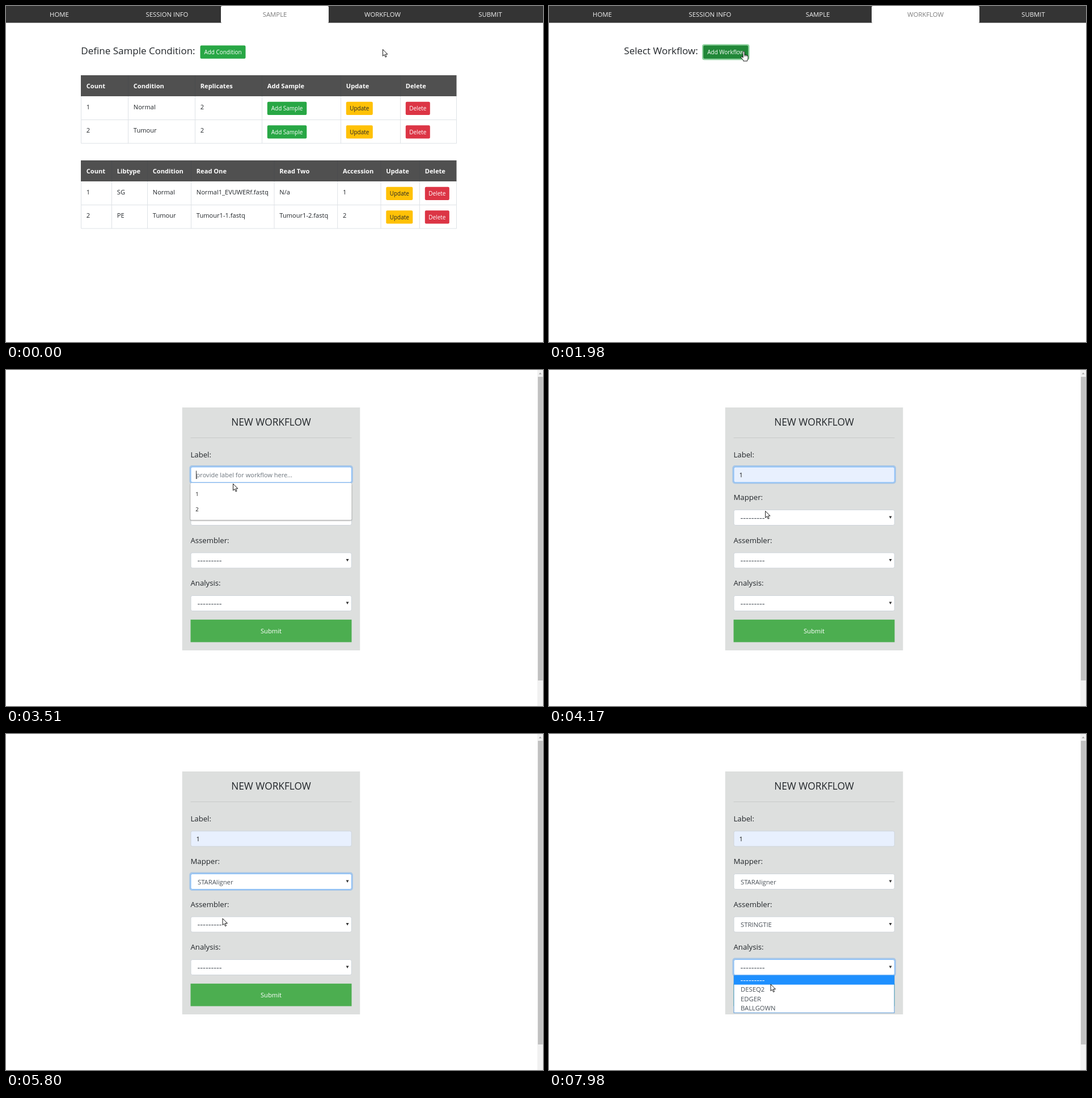
An HTML page that plays this animation: 947 px wide and 592 px high, repeating every 8000 ms.

```html
<!DOCTYPE html>
<html lang="en">
<head>
<meta charset="utf-8">
<title>Workflow form</title>
<style>
html, body { margin: 0; width: 100%; height: 100%; overflow: hidden; background: #fff; }
svg { display: block; font-family: "Open Sans", "Noto Sans", sans-serif; }
</style>
</head>
<body>
<svg id="stage" width="947" height="592" viewBox="0 0 947 592"></svg>
<script>
const LOOP = 8000;
const GREEN = '#28a745', YELLOW = '#ffc107', RED = '#dc3545';
const INK = '#212529', FIELD_INK = '#495057', LINE = '#dee2e6';
const DASHES = '---------';
const ROW = 16.3;

// start, end, number of steps, target x, target y
const moves = [
  [100, 430, 4, 663.5, 24],
  [980, 1200, 3, 550, 53],
  [1520, 1860, 4, 343.5, 80],
  [2630, 2760, 2, 400, 222],
  [3070, 3070, 1, 402, 196],
  [3510, 3510, 1, 400.5, 200.5],
  [3840, 3950, 2, 392, 216],
  [4060, 4270, 3, 378, 260],
  [4950, 5040, 2, 379, 291],
  [5480, 5800, 4, 382, 325],
  [6240, 6560, 4, 386.5, 374],
  [6910, 7210, 4, 389, 413],
  [7880, 7980, 2, 391, 441],
];

const selects = [
  { label: 'Mapper:', y: 246, open: 4600, pick: 5370, blur: 6130,
    options: [DASHES, 'STARAligner', 'HISAT2', 'SALMON'] },
  { label: 'Assembler:', y: 321.5, open: 6130, pick: 6910, blur: 7640,
    options: [DASHES, 'STRINGTIE', 'CUFFLINKS', 'MISO', 'HTSEQ', 'FEATURECOUNTS'] },
  { label: 'Analysis:', y: 397, open: 7640, pick: LOOP, blur: LOOP,
    options: [DASHES, 'DESEQ2', 'EDGER', 'BALLGOWN'] },
];

const pointers = {
  arrow: '<path d="M0 0V11.7L2.7 9.2 4.6 13.6 6.5 12.8 4.6 8.5H8.4Z" fill="#fff" stroke="#000" stroke-width=".9"/>',
  hand: '<path d="M-1.4 11V1.3a1.4 1.4 0 0 1 2.8 0V6.3q1.3-.9 2.3.4 1.3-.7 2.1.5 1.7-.5 1.7 1.3V12q0 2-1.3 3.4V17H-.8V15.6L-4.8 10.8q-.6-1.4.9-1.6 1 .2 2.5 1.8Z" fill="#fff" stroke="#000" stroke-width=".9"/><path d="M1.4 6V9M3.7 6.8V9M5.8 7.4V9" stroke="#000" stroke-width=".7"/>',
  beam: '<path d="M-2.5-6.5H2.5M0-6.5V6.5M-2.5 6.5H2.5" stroke="#000" stroke-width=".9"/>',
};

const between = (t, from, to) => t >= from && t < to;
const rect = (x, y, w, h, fill, more = '') =>
  `<rect x="${x}" y="${y}" width="${w}" height="${h}" fill="${fill}" ${more}/>`;
const text = (x, y, s, size = 11.1, fill = INK, more = '') =>
  `<text x="${x}" y="${y}" font-size="${size}" fill="${fill}" ${more}>${s}</text>`;
const path = (d, color) => `<path d="${d}" fill="none" stroke="${color}"/>`;
const centered = 'text-anchor="middle"';
const heading = s => text(132.3, 85, s, 17, INK, 'font-weight="500"');

function button(x, y, w, label, fill) {
  return rect(x, y, w, 23.3, fill, 'rx="2.2"') +
    text(x + w / 2, y + 15.6, label, 9.95, fill === YELLOW ? INK : '#fff', centered);
}

const buttonKinds = {
  'Add Sample': [69.5, GREEN],
  Update: [47, YELLOW],
  Delete: [43, RED],
};

function table(top, columns, heads, rows) {
  const right = 794.5, edges = [...columns, right];
  let out = rect(132, top, 662.5, 37, '#505050');
  heads.forEach((s, i) => {
    out += text(columns[i] + 9.3, top + 23, s, 11.1, '#fff', 'font-weight="700"');
  });
  out += path(columns.slice(1).map(x => `M${x} ${top}v37`).join(''), '#4a4c4e');
  rows.forEach((cells, r) => {
    const y = top + 37 + r * 41.5;
    out += path(`M132.5 ${y + 41.5}H${right}` + edges.map(x => `M${x} ${y}v41.5`).join(''), LINE);
    cells.forEach((s, i) => {
      const kind = buttonKinds[s], x = columns[i] + 9.3;
      out += kind ? button(x, y + 9.7, kind[0], s, kind[1]) : text(x, y + 22.9, s);
    });
  });
  return out;
}

const samplePage = heading('Define Sample Condition:') +
  button(342.5, 69.5, 80, 'Add Condition', GREEN) +
  table(122, [132.5, 215.5, 333.5, 451.5, 590.5, 695.5],
    ['Count', 'Condition', 'Replicates', 'Add Sample', 'Update', 'Delete'],
    [['1', 'Normal', '2', 'Add Sample', 'Update', 'Delete'],
     ['2', 'Tumour', '2', 'Add Sample', 'Update', 'Delete']]) +
  table(272, [132.5, 186.5, 249.5, 326.5, 473, 584.7, 661, 729.5],
    ['Count', 'Libtype', 'Condition', 'Read One', 'Read Two', 'Accession', 'Update', 'Delete'],
    [['1', 'SG', 'Normal', 'Normal1_EVUWERf.fastq', 'N/a', '1', 'Update', 'Delete'],
     ['2', 'PE', 'Tumour', 'Tumour1-1.fastq', 'Tumour1-2.fastq', '2', 'Update', 'Delete']]);

function cursorAt(t) {
  let x = 664.5, y = 76.5;
  for (const [start, end, steps, tx, ty] of moves) {
    if (t < start) break;
    const done = Math.floor((t - start) / (end - start || 1) * (steps - 1) + 1e-6) + 1;
    const p = Math.min(1, done / steps), e = p * p * (3 - 2 * p);
    x += (tx - x) * e;
    y += (ty - y) * e;
  }
  let shape = 'arrow';
  if (y < 30 || between(t, 1520, 2630) && x < 352) shape = 'hand';
  if (between(t, 3070, 3510)) shape = 'beam';
  return { x, y, shape };
}

function navBar(t, cursor) {
  const active = t < 770 ? 2 : 3;
  let out = rect(0, 0, 947, 29.6, '#343434');
  ['HOME', 'SESSION INFO', 'SAMPLE', 'WORKFLOW', 'SUBMIT'].forEach((s, i) => {
    const lit = i === active || i === 3 && cursor.y < 30;
    if (lit) out += rect(i * 190 - 1, 0, 190, 30, '#fff', 'rx="2"');
    out += text(i * 190 + 94, 19.2, s, 11.35, lit ? '#7b7b7b' : '#f2f2f2', centered);
  });
  return out;
}

function tabPages(t, cursor) {
  const leaving = t < 770 ? 1 : t < 860 ? .8 : t < 980 ? .45 : .13;
  let page = samplePage, opacity = leaving;
  if (t >= 1090) {
    const hover = cursor.shape === 'hand';
    page = heading('Select Workflow:') +
      (t >= 1980 ? rect(270, 67.2, 83.5, 28, '#93d3a2', 'rx="4"') : '') +
      button(272.2, 69.5, 79, 'Add Workflow', hover ? '#218838' : GREEN);
    opacity = t < 1200 ? .5 : 1;
  }
  return navBar(t, cursor) + `<g opacity="${opacity}">${page}</g>`;
}

function field(y, focused, fill = '#fff') {
  return (focused ? rect(323.3, y - 2.4, 288.6, 32.3, '#a6c6e8', 'rx="4.5"') : '') +
    rect(326, y + .5, 283.3, 27, fill, `rx="2.8" stroke="${focused ? '#80bdff' : '#ced4da'}"`);
}

// Hyphens are set larger than the words around them.
const optionText = (y, s, fill) => s === DASHES
  ? text(337.6, y + .7, s, 14.8, fill)
  : text(338, y, s, 11.25, fill);

function dropDown(select, cursor) {
  const top = select.y + 28.3;
  const current = Math.max(0, Math.floor((cursor.y - top) / ROW));
  let out = rect(326, top, 283, select.options.length * ROW + .7, '#fff', 'stroke="#5b9bd9"');
  out += rect(326, top + current * ROW, 283, ROW, '#1e90ff');
  select.options.forEach((s, i) => {
    out += optionText(top + i * ROW + 12.8, s, i === current ? '#fff' : FIELD_INK);
  });
  return out;
}

function suggestions(hover) {
  return rect(325.3, 199, 284.2, 65.3, '#fff', 'rx="2" style="filter:drop-shadow(0 1px 1.2px #0007)"') +
    (hover ? rect(325.3, 205.5, 284.2, 26.5, '#ececec') : '') +
    text(334.3, 222, '1', 9.5, '#111') + text(334.3, 248.7, '2', 9.5, '#111');
}

function formPage(t, cursor) {
  const filled = t >= 3840, typing = between(t, 3180, 4600);
  let out = rect(937, 0, 10, 592, '#f1f1f1') + rect(938, 12, 8.6, 535, '#c1c1c1') +
    '<path d="M939.6 7.4h5l-2.5-3Z" fill="#a3a3a3"/>' +
    rect(310.7, 66, 313.6, 428, '#dddfde') +
    text(467.5, 98, 'NEW WORKFLOW', 17.3, INK, centered + ' font-weight="500"') +
    path('M325.5 119.5H609.5', '#c8cac9') +
    text(325.5, 153.8, 'Label:', 13.15) +
    field(170.5, typing, filled ? '#e8f0fe' : '#fff') +
    (filled ? text(335.5, 189.2, '1', 11.1, '#111')
            : text(335.6, 189.2, 'provide label for workflow here...', 11.05, '#6c757d'));
  if (typing && !filled) out += path('M335.5 177.5V192', '#333');
  for (const s of selects) {
    out += text(325.5, s.y - 16.9, s.label, 13.15) +
      field(s.y, between(t, s.open, s.blur)) +
      optionText(s.y + 18.8, s.options[t >= s.pick ? 1 : 0], FIELD_INK) +
      `<path d="M599.6 ${s.y + 11.5}h5l-2.5 4.6Z" fill="#333"/>`;
  }
  out += rect(325.5, 439.8, 284, 39.7, '#4cae50') +
    text(467.5, 464, 'Submit', 11.2, '#fff', centered);
  if (between(t, 3290, 4060)) out += suggestions(filled);
  const opened = selects.find(s => between(t, s.open, s.pick));
  return opened ? out + dropDown(opened, cursor) : out;
}

function scene(t) {
  const cursor = cursorAt(t);
  const page = t < 2300 ? tabPages(t, cursor) : formPage(t, cursor);
  return page + `<g transform="translate(${cursor.x} ${cursor.y})">${pointers[cursor.shape]}</g>`;
}

const stage = document.getElementById('stage');
const begin = performance.now();
let shown = '';
function draw() {
  const next = scene((performance.now() - begin) % LOOP);
  if (next !== shown) stage.innerHTML = shown = next;
  requestAnimationFrame(draw);
}
draw();
</script>
</body>
</html>
```
